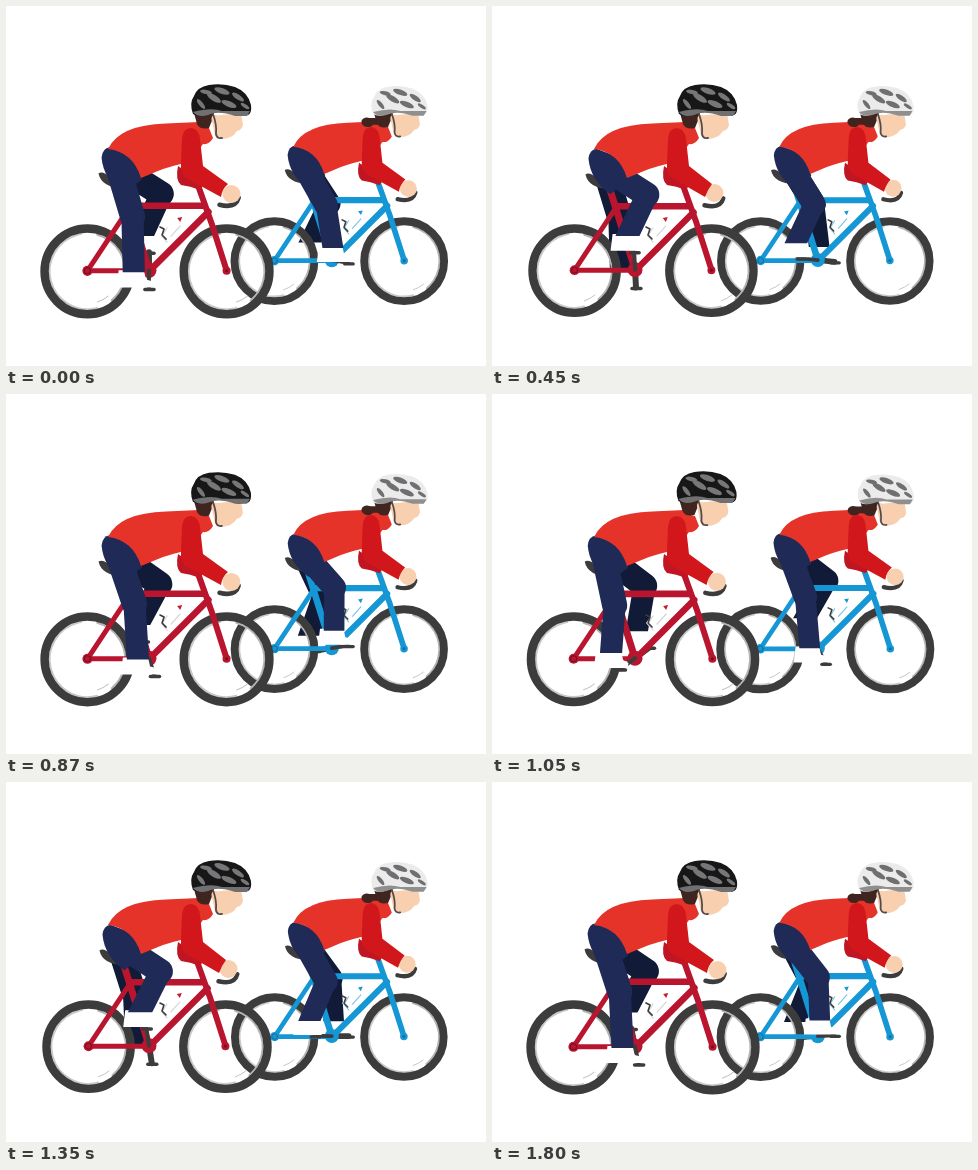
Animation of 480 by 360 pixels, one loop 1830 ms. Source, as an HTML page with a canvas:

```html
<!DOCTYPE html>
<html lang="en">
<head>
<meta charset="utf-8">
<title>Two cyclists</title>
<style>
html, body { margin: 0; width: 100%; height: 100%; overflow: hidden; background: #fff; }
canvas { display: block; }
</style>
</head>
<body>
<canvas id="stage" width="480" height="360"></canvas>
<script>
const ctx = document.getElementById('stage').getContext('2d');
const LOOP = 1830, STEP = 30, TURN = LOOP / 2, TAU = Math.PI * 2;
const DARK = '#3d3c3c', NAVY = '#1f2a57', SHADE = '#111a36', SKIN = '#f8cfaf', HAIR = '#40241f';
const BB = [143, 264], HIP = [112, 161], THIGH = 51, SHIN = 46, CRANK = 18;

function fill(color, d) {
  ctx.fillStyle = color;
  ctx.fill(new Path2D(d));
}
function line(color, width, d, cap = 'round') {
  ctx.strokeStyle = color;
  ctx.lineWidth = width;
  ctx.lineCap = cap;
  ctx.lineJoin = 'round';
  ctx.stroke(new Path2D(d));
}
function oval(color, x, y, rx, ry = rx, tilt = 0) {
  ctx.fillStyle = color;
  ctx.beginPath();
  ctx.ellipse(x, y, rx, ry, tilt, 0, TAU);
  ctx.fill();
}
function arc(color, width, x, y, r, from = 0, to = 360) {
  ctx.strokeStyle = color;
  ctx.lineWidth = width;
  ctx.lineCap = 'round';
  ctx.beginPath();
  ctx.arc(x, y, r, from * TAU / 360, to * TAU / 360);
  ctx.stroke();
}

function wheel(x, y) {
  arc('#c9c9c9', 2, x, y, 37.5, 75, 260);
  arc('#b4b4b4', 2, x, y, 37.5, 285, 410);
  arc('#c4c4c4', 1, x, y, 32, 50, 72);
  arc(DARK, 8.4, x, y, 42.5);
}

// Knee position from the two bone lengths, always bent a little forward.
function knee([ax, ay]) {
  const dx = ax - HIP[0], dy = ay - HIP[1], d = Math.hypot(dx, dy);
  const reach = Math.min(d, THIGH + SHIN);
  const along = (THIGH ** 2 - SHIN ** 2 + reach ** 2) / (2 * reach);
  const out = Math.sqrt(Math.max(50, THIGH ** 2 - along ** 2));
  return [HIP[0] + (dx * along + dy * out) / d, HIP[1] + (dy * along - dx * out) / d];
}

function leg(angle, color, far) {
  const cos = Math.cos(angle), sin = Math.sin(angle);
  const px = BB[0] + CRANK * cos, py = BB[1] + CRANK * sin;
  const ax = px - 11 - 5 * cos - 4 * sin, ay = py - 16;
  const [kx, ky] = knee([ax, ay]);
  const crank = () => line(DARK, far ? 6 : 4, `M${BB} L${px} ${py}`);
  if (!far) crank();
  fill('#fff', `M${ax - 15} ${ay - 2} H${ax + 10} L${ax + 12} ${ay + 7} L${px + 8} ${py - 6}
    L${px + 7} ${py - 1} H${ax - 17}Z`);
  if (far) crank();
  line(DARK, 3.5, `M${px - 4} ${py + 1} h9`);

  // The trouser cuff is cut level.
  ctx.save();
  ctx.beginPath();
  ctx.rect(0, 0, 300, ay);
  ctx.clip();
  line(color, 25, `M${HIP} L${kx} ${ky}`);
  line(color, 22, `M${kx} ${ky} L${ax} ${ay} l${(ax - kx) * .3} ${(ay - ky) * .3}`);
  ctx.restore();
}

function frame(color, dark) {
  wheel(82, 265);
  wheel(220, 265);
  line(color, 5, 'M122 204 L82 264.5 H143');
  line(color, 7, 'M117 181 L143 264');
  line(color, 6.5, 'M124 200 H198 M202 206 L145 263');
  line(color, 6, 'M191 178 L205 217 L220 264');
  oval(color, 143, 264, 7.5);
  oval(color, 82, 264.5, 5);
  arc(dark, 1, 82, 264.5, 3);
  oval(color, 220, 264.5, 4);
  oval(dark, 220, 264.5, 1.5);
  fill(DARK, 'M93 168 Q97 165 105 172 L122 178 L118 183 Q96 182 93 168Z');
}

function bottle(accent, outline) {
  fill('#fff', 'M154 229 L166 213 L175 220 L162 238Z');
  line(outline, 1.2, 'M161 222 L156 230 L161 236 M165 230 L174 220');
  line(DARK, 1.6, 'M154 221 l4 2 l-2 6 l4 4');
  fill(accent, 'M171 212 l5 -1 l-2 5Z');
}

function head(look, dy) {
  ctx.save();
  ctx.translate(dy * .6, dy);
  if (look.bun) {
    oval(HAIR, 181, 117, 6.5, 5, .2);
    line(HAIR, 7, 'M184 116 L196 116');
  }
  fill(SKIN, 'M205 110 L235 107 Q236 113 237 119 Q236 124 231 125 Q226 133 215 133 L209 130Z');
  fill(HAIR, 'M188 107 L208 107 Q206 116 203 122 Q194 124 191 118Z');
  oval(SKIN, 209, 113, 3.5, 4);
  line('#514b4a', 1.8, 'M207 108 Q211 119 210 128 Q211 133 216 132');
  const [shell, hole, band] = look.helmet;
  fill(shell, `M187 108 Q183 97 188 90 Q191 81 203 79 Q217 77 229 81
    Q242 86 245 99 Q246 107 242 109 L232 110 Q212 103 202 108 Q193 112 187 108Z`);
  fill(band, 'M187 106 Q205 101 216 105 L244 105 L241 110 L229 110 Q212 104 202 109 Q192 112 187 106Z');
  for (const [x, y, rx, tilt] of [
    [200, 86, 6, .2], [216, 85, 8, .35], [232, 91, 7, .6],
    [208, 92, 8, .55], [223, 98, 8, .4], [195, 98, 6, .9], [239, 100, 5, .6]
  ]) oval(hole, x, y, rx, rx * .36, tilt);
  ctx.restore();
}

function cyclist(look, phase) {
  const sway = Math.cos(phase - look.lag);
  const bob = look.bob * (Math.cos(2 * phase) - 1);
  const angle = phase + look.crank;
  const pulse = () => {
    const k = 1 + look.pulse * sway;
    ctx.save();
    ctx.translate(151, 225);
    ctx.scale(k, k);
    ctx.translate(-151, -225);
  };
  ctx.save();
  ctx.translate(look.x, look.y);
  ctx.scale(look.size, look.size);

  pulse();
  leg(angle + Math.PI, SHADE, true);
  bottle(look.accent, look.outline);
  frame(look.bike, look.hub);
  line(DARK, 4.5, 'M213 199 Q229 203 232 192');
  ctx.restore();

  fill('#c01522', 'M172 160 L198 178 L194 184 Q184 180 175 179 Q169 174 172 160Z');
  pulse();
  leg(angle, NAVY, false);
  fill(NAVY, 'M96 152 Q97 143 104 142 L130 152 L136 174 L118 188 Q98 174 96 152Z');
  ctx.restore();

  fill('#e5332a', `M102 143 Q113 119 160 117.5 L193 116 Q198 122 203 122 L207 132 Q203 139 197 138
    L184 156 Q164 160 152 165 L135 172 Q127 146 102 143Z`);
  head(look, bob);
  oval(SKIN, 224 + sway * 1.5, 187.5 + sway * .5, 9);
  fill('#d1171b', `M176 133 Q177 122 185 122 Q193 123 194 133 L197 160 L${221 + sway} 178
    Q216 183 ${214 + sway} 191 L180 172 Q174 168 175 157Z`);
  ctx.restore();
}

const rear = {
  x: 191.7, y: 6.6, size: .9377, crank: .16, lag: 1.05, pulse: .005, bob: -.4, bun: true,
  bike: '#1597d5', hub: '#176a96', accent: '#1597d5', outline: '#7cc5e3',
  helmet: ['#ebebeb', '#6f6f72', '#8f8f8f']
};
const lead = {
  x: 0, y: 0, size: 1, crank: Math.PI / 2, lag: 0, pulse: .0085, bob: .75, bun: false,
  bike: '#b9152f', hub: '#701020', accent: '#c51b2b', outline: '#d5d5d5',
  helmet: ['#171717', '#77777a', '#707072']
};

function draw() {
  const t = Math.floor(performance.now() % LOOP / STEP) * STEP;
  const phase = t / TURN * TAU;
  ctx.fillStyle = '#fff';
  ctx.fillRect(0, 0, 480, 360);
  cyclist(rear, phase);
  cyclist(lead, phase);
  requestAnimationFrame(draw);
}
draw();
</script>
</body>
</html>
```
